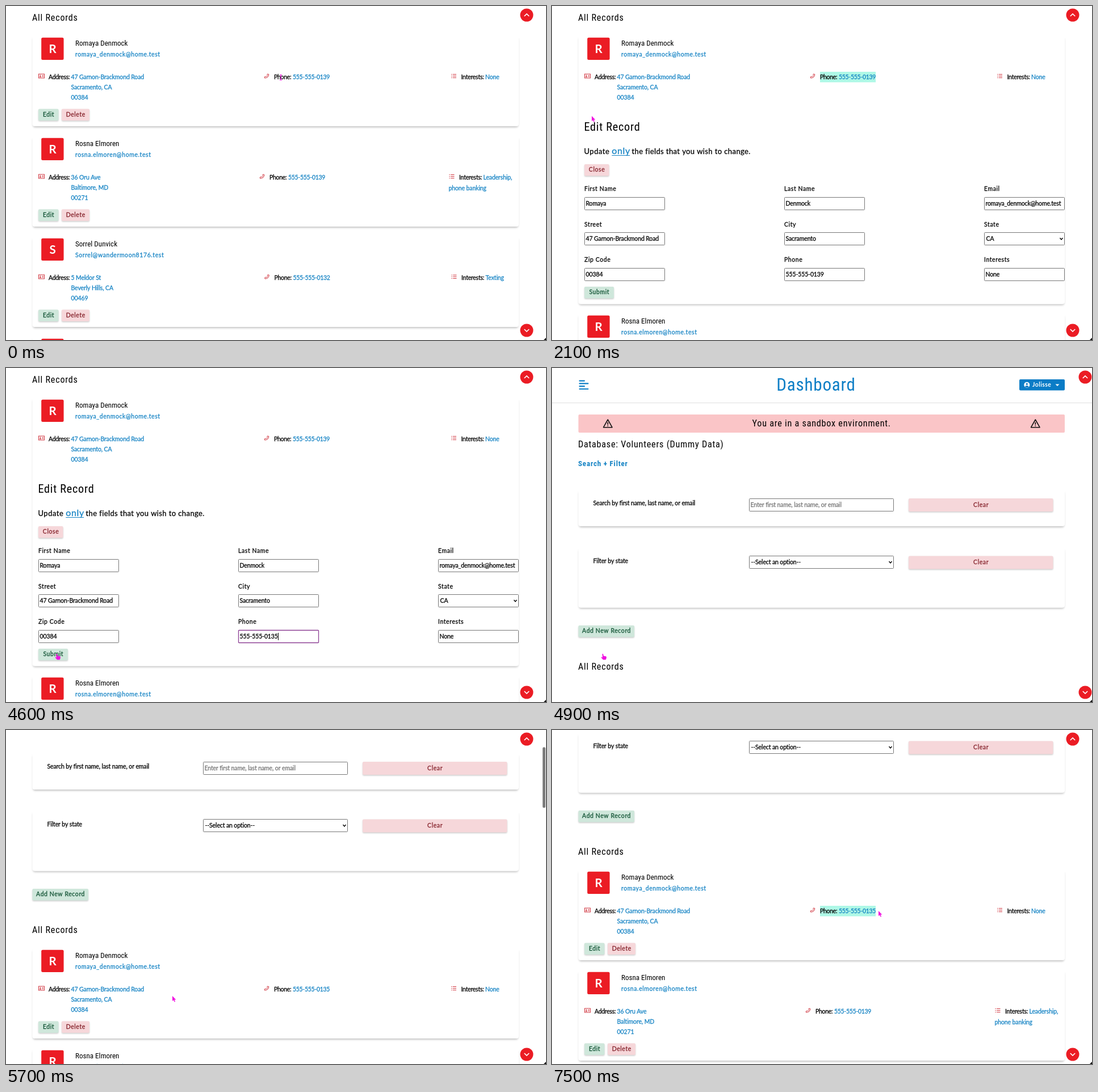
Recreate the animation shown at these times as an HTML page with a canvas. Size 951 by 589 pixels, loop 7600 ms.

```html
<!DOCTYPE html>
<html lang="en">
<head>
<meta charset="utf-8">
<title>Records dashboard</title>
<style>
  html, body { margin: 0; width: 100%; height: 100%; overflow: hidden; background: #fff; }
  canvas { display: block; }
</style>
</head>
<body>
<canvas id="stage" width="951" height="589"></canvas>
<script>
const ctx = document.getElementById('stage').getContext('2d');
const LOOP = 7600, STEP = 100;
const BLUE = '#1583c4', RED = '#eb1c24', ICON = '#d0323c', MAGENTA = '#f012e0';
const GREEN = { fill: '#cfe7db', ink: '#0f5132' };
const PINK = { fill: '#f6d7da', ink: '#842029' };
const BODY = 'Lato, sans-serif';
const HEAD = '"Roboto Condensed", Roboto, sans-serif';

const OPEN = 1800, FOCUS = 2700, ERASE = 3400, RETYPE = 3600, BLUR = 4700, RELOAD = 4900, LOADED = 5100;
const OLD_PHONE = '555-555-0139', NEW_PHONE = '555-555-0135';

const records = [
  { name: 'Romaya Denmock', email: 'romaya_denmock@home.test', phone: OLD_PHONE, phoneX: 472,
    address: ['47 Garnon-Brackmond Road', 'Sacramento, CA', '00384'], interestX: 801.5, interests: ['None'] },
  { name: 'Rosna Elmoren', email: 'rosna.elmoren@home.test', phone: OLD_PHONE, phoneX: 464,
    address: ['36 Oru Ave', 'Baltimore, MD', '00271'], interestX: 798, interests: ['Leadership,', 'phone banking'] },
  { name: 'Sorrel Dunvick', email: 'Sorrel@wandermoon8176.test', phone: '555-555-0132', phoneX: 472.5,
    address: ['5 Meldor St', 'Beverly Hills, CA', '00469'], interestX: 802, interests: ['Texting'] },
  { name: '' }
];

const cursorKeys = [
  [0, 484, 126], [100, 484, 126], [300, 472, 125], [1000, 577, 125], [1100, 577, 126],
  [1600, 76, 191], [1800, 76, 191], [2000, 70, 194], [2300, 70, 194], [2700, 495, 474],
  [3900, 495, 474], [4500, 91, 504], [5000, 91, 504], [5300, 293, 469], [6000, 293, 469],
  [6400, 472, 319], [6500, 472, 319], [7000, 575, 319]
];
const scrollKeys = [[5400, 0], [5500, 50], [5700, 174], [5900, 280], [6100, 312]];
const cursorKinds = [
  [0, 'beam'], [1000, 'arrow'], [1600, 'hand'], [OPEN, 'arrow'], [2700, 'beam'], [ERASE, 'none'],
  [3900, 'beam'], [4000, 'arrow'], [4500, 'hand'], [5100, 'arrow'], [6300, 'beam'], [6900, 'arrow']
];

const smooth = u => u * u * (3 - 2 * u);

function along(keys, t, ease = u => u) {
  const i = keys.findIndex(k => k[0] > t);
  if (i === 0) return keys[0].slice(1);
  if (i < 0) return keys[keys.length - 1].slice(1);
  const a = keys[i - 1], b = keys[i], u = ease((t - a[0]) / (b[0] - a[0]));
  return a.slice(1).map((v, n) => v + (b[n + 1] - v) * u);
}

function setFont(size, family, weight, spacing) {
  ctx.font = `${weight} ${size}px ${family}`;
  ctx.fontStretch = family === HEAD ? 'condensed' : 'normal';
  ctx.letterSpacing = spacing + 'px';
}

// Tighten headings when only the regular width is available.
setFont(100, HEAD, 400, 0);
const tighten = ctx.measureText('Dashboard').width > 460 ? 0.056 : 0;

// y is the middle of the capitals; body text gets a hairline outline for a medium weight
function text(str, x, y, { size = 10.5, color = '#000', spacing = -0.12, family = BODY, weight = 400, align = 'left' } = {}) {
  setFont(size, family, weight, family === HEAD ? spacing - size * tighten : spacing);
  ctx.fillStyle = ctx.strokeStyle = color;
  ctx.textAlign = align;
  ctx.fillText(str, x, y + size * 0.36);
  if (family === BODY && weight === 400) {
    ctx.lineWidth = 0.28;
    ctx.strokeText(str, x, y + size * 0.36);
  }
  return ctx.measureText(str).width;
}

const heading = (str, x, y, size = 16.2, more = {}) =>
  text(str, x, y, { size, family: HEAD, spacing: 0.75, ...more });
const label = (str, x, y, more = {}) => text(str, x, y, { spacing: 0.58, ...more });

function box(x, y, w, h, fill, radius = 0) {
  ctx.fillStyle = fill;
  ctx.beginPath();
  ctx.roundRect(x, y, w, h, radius);
  ctx.fill();
}

function line(points, color, width = 1) {
  ctx.strokeStyle = color;
  ctx.lineWidth = width;
  ctx.beginPath();
  points.forEach(([x, y]) => ctx.lineTo(x, y));
  ctx.stroke();
}

function shape(points, fill) {
  ctx.fillStyle = fill;
  ctx.beginPath();
  points.forEach(([x, y]) => ctx.lineTo(x, y));
  ctx.closePath();
  ctx.fill();
}

function shadowBox(x, y, w, h, fill, radius, blur, alpha, drop) {
  ctx.save();
  ctx.shadowColor = `rgba(0,0,0,${alpha})`;
  ctx.shadowBlur = blur;
  ctx.shadowOffsetY = drop;
  box(x, y, w, h, fill, radius);
  ctx.restore();
}

// The shadow shows below the card and fades out towards its top.
function card(y, h) {
  shadowBox(47.5, y + 8, 854.5, h - 8, '#fff', 4, 3.5, 0.24, 2);
  box(46.5, y, 856.5, h, '#fff', 4);
}

function button(str, x, y, w, h, style) {
  shadowBox(x, y, w, h, style.fill, 2, 2.5, 0.2, 1.5);
  label(str, x + w / 2 + 0.3, y + h / 2 - 0.7, { color: style.ink, align: 'center' });
}

function field(x, y, w, h, value, { focus = false, color = '#000', select = false } = {}) {
  ctx.strokeStyle = focus ? '#8c3f94' : '#777';
  ctx.lineWidth = focus ? 1.3 : 1;
  ctx.beginPath();
  ctx.roundRect(x + 0.5, y + 0.5, w - 1, h - 1, 1);
  ctx.stroke();
  const width = text(value, x + (select ? 3.5 : 2.5), y + h / 2, { color });
  if (select) line([[x + w - 8.5, y + h / 2 - 1.5], [x + w - 6, y + h / 2 + 1.5], [x + w - 3.5, y + h / 2 - 1.5]], '#000', 1.4);
  return x + 2.5 + width;
}

function addressIcon(x, y) {
  ctx.strokeStyle = ICON;
  ctx.lineWidth = 1;
  ctx.strokeRect(x + 0.5, y - 3.5, 10, 7);
  box(x + 2.5, y - 2, 2, 2, ICON, 1);
  box(x + 2, y + 0.5, 3, 1.5, ICON);
  box(x + 6.5, y - 1.5, 2.5, 1, ICON);
  box(x + 6.5, y + 0.5, 2.5, 1, ICON);
}

function phoneIcon(x, y) {
  ctx.strokeStyle = ICON;
  ctx.lineWidth = 1;
  ctx.beginPath();
  ctx.moveTo(x + 1.5, y - 3.6);
  ctx.lineTo(x + 3.8, y - 3);
  ctx.quadraticCurveTo(x + 3.6, y + 3.3, x - 3.4, y + 3.6);
  ctx.lineTo(x - 3.8, y + 1.6);
  ctx.lineTo(x - 1.6, y + 0.6);
  ctx.lineTo(x - 0.6, y + 1.4);
  ctx.lineTo(x + 1.6, y - 0.8);
  ctx.lineTo(x + 0.8, y - 1.8);
  ctx.closePath();
  ctx.stroke();
}

function listIcon(x, y) {
  for (const dy of [-3, 0, 3]) {
    box(x, y + dy - 0.5, 1.4, 1, ICON);
    box(x + 2.7, y + dy - 0.5, 6.3, 1, ICON);
  }
}

function warningIcon(x, y) {
  ctx.lineJoin = 'round';
  line([[x, y - 7], [x + 7.7, y + 6.7], [x - 7.7, y + 6.7], [x, y - 7], [x + 7.7, y + 6.7]], '#111', 1.6);
  ctx.lineJoin = 'miter';
  box(x - 0.8, y - 2.5, 1.6, 4.5, '#111');
  box(x - 0.8, y + 3.2, 1.6, 1.6, '#111');
}

function drawTop(y) {
  const at = v => v - y;
  [10.5, 17, 10.5, 17].forEach((w, i) => box(47.5, at(21.5 + i * 4.8), w, 2.2, '#0f7fc6', 1));
  heading('Dashboard', 465, at(29), 31.2, { color: '#0f7fc6', align: 'center' });
  box(0, at(61), 951, 1, '#dedede');

  box(823, at(20), 80, 19.5, '#0b7cc6', 2);
  ctx.fillStyle = '#fff';
  ctx.beginPath();
  ctx.arc(836.3, at(29.8), 5, 0, Math.PI * 2);
  ctx.fill();
  ctx.fillStyle = '#0b7cc6';
  ctx.beginPath();
  ctx.arc(836.3, at(28.3), 1.7, 0, Math.PI * 2);
  ctx.ellipse(836.3, at(32.7), 3, 1.6, 0, 0, Math.PI * 2);
  ctx.fill();
  label('Jolisse', 846, at(29.5), { color: '#fff', weight: 700, spacing: 0.4 });
  shape([[886.5, at(28.5)], [893.5, at(28.5)], [890, at(32)]], '#fff');

  box(46.5, at(82), 856.5, 32, '#fac5c7', 2);
  warningIcon(98.3, at(98));
  warningIcon(851.3, at(98));
  heading('You are in a sandbox environment.', 474.7, at(97.5), 16.2, { align: 'center' });
  heading('Database: Volunteers (Dummy Data)', 46, at(134));
  heading('Search + Filter', 46, at(168.7), 13.2, { color: BLUE, weight: 700 });

  card(at(208), 71);
  text('Search by first name, last name, or email', 72.5, at(238.5));
  field(347, at(230), 255, 23, 'Enter first name, last name, or email', { color: '#757575' });
  button('Clear', 628, at(230), 254.5, 23, PINK);
  card(at(310), 112.5);
  text('Filter by state', 72.5, at(340.3));
  field(347, at(331), 255, 23, '--Select an option--', { select: true });
  button('Clear', 628, at(331.5), 254.5, 23, PINK);
  button('Add New Record', 46.5, at(454), 98.5, 20.5, GREEN);
}

function drawForm(y, rec, t) {
  heading('Edit Record', 56.5, y + 167, 20.2);
  text('Update', 56.5, y + 210, { size: 13, spacing: 0.5 });
  const w = text('only', 105.3, y + 209.5, { size: 16, spacing: 0.6, color: BLUE });
  box(105.3, y + 217, w - 0.5, 1, BLUE);
  text('the fields that you wish to change.', 140.5, y + 210, { size: 13, spacing: 0.4 });
  button('Close', 57, y + 233, 43.5, 20.5, PINK);

  const focus = t >= FOCUS && t < BLUR;
  const phone = t < ERASE ? OLD_PHONE : t < RETYPE ? OLD_PHONE.slice(0, -1) : NEW_PHONE;
  const [first, last] = rec.name.split(' ');
  const rows = [
    [['First Name', first], ['Last Name', last], ['Email', rec.email]],
    [['Street', rec.address[0]], ['City', 'Sacramento'], ['State', 'CA']],
    [['Zip Code', rec.address[2]], ['Phone', phone], ['Interests', rec.interests[0]]]
  ];
  rows.forEach((row, r) => row.forEach(([title, value], c) => {
    const x = 57 + c * 352, top = y + 276.5 + r * 62.3, fieldTop = Math.round(top + 14.5);
    const active = focus && title === 'Phone';
    label(title, x, top);
    const end = field(x, fieldTop, 142, 23, value, { focus: active, select: title === 'State' });
    const lastKey = t < ERASE ? FOCUS : t < RETYPE ? ERASE : RETYPE;
    if (active && (t - lastKey) % 1000 < 500) box(Math.round(end), fieldTop + 5, 1, 13, '#000');
  }));
  button('Submit', 57, y + 449, 52, 20.5, GREEN);
}

function drawRecord(rec, y, { editing, selectTo, t }) {
  card(y, editing ? 479.5 : 166);
  box(62.2, y + 9.7, 39.4, 39.4, RED, 2.5);
  if (!rec.name) return;
  text(rec.name[0], 82, y + 29.8, { size: 20.5, color: '#fff', weight: 700, spacing: 0, align: 'center' });
  heading(rec.name, 122, y + 19.3, 13.1, { spacing: 0 });
  label(rec.email, 122, y + 39, { color: BLUE });

  const row = y + 79, phone = t >= RELOAD && rec === records[0] ? NEW_PHONE : rec.phone;
  addressIcon(57, row - 1.5);
  text('Address:', 75, row, { spacing: -0.3 });
  rec.address.forEach((part, i) => text(part, 114.5, row + i * 18.3, { color: BLUE }));

  phoneIcon(rec.phoneX - 13, row - 1.5);
  if (selectTo > rec.phoneX) {
    setFont(10.5, BODY, 400, -0.3);
    const end = rec.phoneX + 33 + ctx.measureText(phone).width;
    box(rec.phoneX, row - 9, Math.min(selectTo, end) - rec.phoneX, 18.5, '#aef8e6');
  }
  text('Phone:', rec.phoneX, row, { spacing: -0.3 });
  text(phone, rec.phoneX + 33, row, { color: BLUE, spacing: -0.3 });

  listIcon(rec.interestX - 17.5, row - 1.5);
  text('Interests:', rec.interestX, row, { spacing: -0.25 });
  rec.interests.forEach((part, i) =>
    text(part, i ? 779.5 : rec.interestX + 42.5, row + i * 18.8, { color: BLUE }));

  if (editing) drawForm(y, rec, t);
  else {
    button('Edit', 57, y + 135.5, 35.5, 20.5, GREEN);
    button('Delete', 98, y + 135.5, 49, 20.5, PINK);
  }
}

function jumpButton(x, y, dir) {
  ctx.fillStyle = RED;
  ctx.beginPath();
  ctx.arc(x, y, 11.5, 0, Math.PI * 2);
  ctx.fill();
  line([[x - 4.2, y - dir * 2], [x, y + dir * 2], [x + 4.2, y - dir * 2]], '#fff', 1.7);
}

function drawCursor(kind, x, y) {
  ctx.save();
  ctx.translate(x, y);
  if (kind === 'beam') {
    line([[0, -4.5], [0, 5]], MAGENTA, 1.2);
    for (const s of [-1, 1]) {
      line([[-2, s * 5], [0, s * 4.2], [2, s * 5]], MAGENTA, 1);
    }
  } else if (kind === 'arrow') {
    shape([[0, 0], [0, 9], [2.1, 7.2], [3.6, 10.6], [5.1, 10], [3.6, 6.7], [6.3, 6.5]], MAGENTA);
  } else if (kind === 'hand') {
    shape([[-2.5, 0], [-1, 0], [0, 4], [3.5, 4.2], [5, 5.5], [4.6, 8.5], [3.5, 10.5], [-1, 10.5], [-4.5, 6.5], [-3.6, 5.6], [-2, 6.5]], MAGENTA);
  }
  ctx.restore();
}

function draw(t) {
  ctx.fillStyle = '#fff';
  ctx.fillRect(0, 0, 951, 589);
  const reloaded = t >= RELOAD, loaded = !reloaded || t >= LOADED;
  const scroll = reloaded ? Math.round(along(scrollKeys, t)[0]) : 506;
  const [cx, cy] = along(cursorKeys, t, smooth);
  const editing = t >= OPEN && !reloaded;

  let selectTo = 0;
  if (t >= 300 && t < FOCUS) selectTo = t < 1000 ? cx - 2 : 600;
  if (t >= 6500) selectTo = t < 7000 ? cx - 2 : 600;

  if (reloaded) drawTop(scroll);
  const top = 525.7 - scroll;
  heading('All Records', 46, top);
  if (loaded) {
    let y = Math.round(top + 26.3);
    records.forEach((rec, i) => {
      const open = editing && i === 0;
      if (y < 589) drawRecord(rec, y, { editing: open, selectTo: i ? 0 : selectTo, t });
      y += open ? 490 : 177;
    });
  }

  const edge = loaded ? 917 : 939;
  jumpButton(edge, 16, -1);
  jumpButton(edge, 572, 1);
  if (t >= 5400 && t < 6400) {
    ctx.globalAlpha = Math.min(1, (6400 - t) / 200);
    box(945, 2 + scroll * 0.163, 5, 107, '#7d7d7d', 2.5);
    ctx.globalAlpha = 1;
  }
  shape([[951, 585], [951, 589], [947, 589]], '#111');
  drawCursor(cursorKinds.filter(k => k[0] <= t).pop()[1], cx, cy);
}

const start = performance.now();
function tick() {
  const t = (performance.now() - start) % LOOP;
  draw(Math.floor(t / STEP) * STEP);
  requestAnimationFrame(tick);
}
tick();
</script>
</body>
</html>
```
